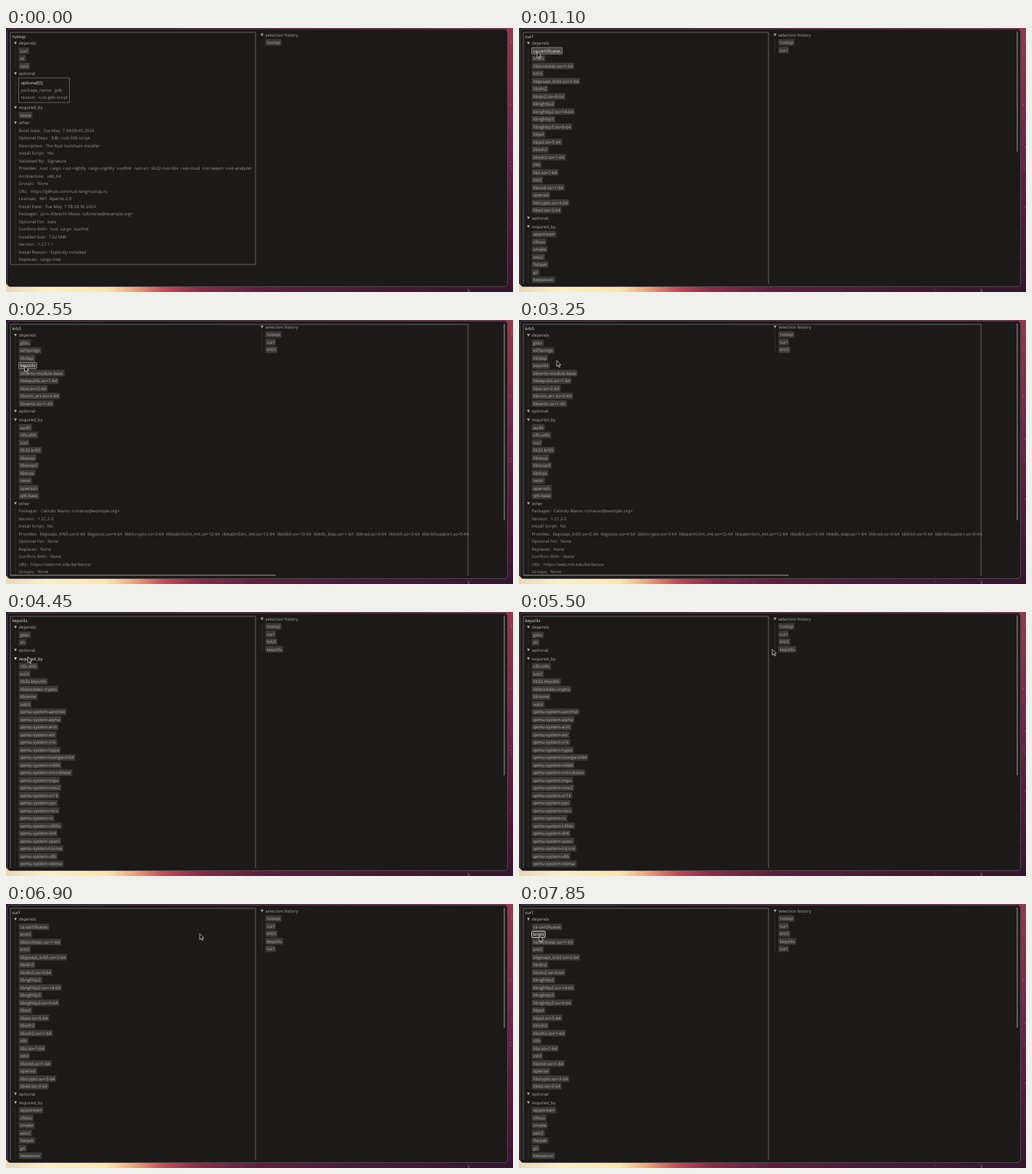
Write an HTML page that moves like this. It is 699 px wide and 365 px high and loops after 8000 ms.

```html
<!DOCTYPE html>
<html lang="en">
<head>
<meta charset="utf-8">
<title>Package browser</title>
<style>
  html, body { margin: 0; width: 100%; height: 100%; overflow: hidden; background: #3a1430; }
  svg { display: block; width: 699px; height: 365px; }
  text { font: 5.95px "Open Sans", "Noto Sans", sans-serif; white-space: pre; text-rendering: geometricPrecision; }
  .label { fill: #939390; }
  .strong { fill: #e6e6e4; }
  .line { fill: none; stroke: #63625f; stroke-width: 1; }
  .indent { stroke: #3a3937; stroke-width: .6; }
  .bar { fill: #858582; }
  .head { fill: #acacaa; }
  .head.hover, .head.press { fill: #f2f2f0; }
  .button rect { fill: #3b3a38; stroke: none; stroke-width: .8; }
  .button text { fill: #b0b0ae; }
  .button.hover rect { fill: #454442; stroke: #969694; }
  .button.hover text { fill: #f0f0ee; }
  .button.press rect { fill: #3d3c3a; stroke: #fff; }
  .button.press text { fill: #fff; }
</style>
</head>
<body>
<svg id="stage" viewBox="0 0 699 365">
  <defs>
    <linearGradient id="sky">
      <stop offset="0" stop-color="#2a1b2b"/>
      <stop offset=".5" stop-color="#40203a"/>
      <stop offset="1" stop-color="#6e2a46"/>
    </linearGradient>
    <linearGradient id="glow">
      <stop offset="0" stop-color="#e9d8b8"/>
      <stop offset=".08" stop-color="#faf0c4"/>
      <stop offset=".2" stop-color="#fbe5a4"/>
      <stop offset=".25" stop-color="#eea878"/>
      <stop offset=".31" stop-color="#c84a54"/>
      <stop offset=".38" stop-color="#8a2a48"/>
      <stop offset=".5" stop-color="#5e1e3c"/>
      <stop offset=".7" stop-color="#481a36"/>
      <stop offset="1" stop-color="#34142e"/>
    </linearGradient>
    <linearGradient id="side" x2="0" y2="1">
      <stop offset="0" stop-color="#93384f"/>
      <stop offset=".2" stop-color="#84304c"/>
      <stop offset=".5" stop-color="#642444"/>
      <stop offset="1" stop-color="#34142e"/>
    </linearGradient>
    <clipPath id="view"><rect x="4" y="4" width="685" height="350"/></clipPath>
  </defs>
  <rect width="699" height="365" fill="url(#sky)"/>
  <rect x="690" width="9" height="365" fill="url(#side)"/>
  <rect y="354" width="699" height="11" fill="url(#glow)"/>
  <g id="stars" fill="#e2a8b4"></g>
  <rect x="1.5" y="1.5" width="690" height="356" rx="4.5" fill="#1b1a18" stroke="#524a50"/>
  <g id="ui" clip-path="url(#view)"></g>
  <path id="cursor" d="M0 0V8.2L1.9 6.5 3.2 9.4 4.5 8.8 3.2 6H5.8Z" fill="#0c0c0c" stroke="#dadada" stroke-width=".75" stroke-linejoin="round"/>
</svg>
<script>
const LOOP = 8000, TICK = 50, PITCH = 10.5;
const $ = id => document.getElementById(id);

function add(parent, tag, attrs, text) {
  const el = document.createElementNS("http://www.w3.org/2000/svg", tag);
  for (const key in attrs) el.setAttribute(key, attrs[key]);
  if (text) el.textContent = text;
  parent.appendChild(el);
  return el;
}

const write = (parent, cls, x, y, text) =>
  add(parent, "text", { class: cls, x, y: y + 2.1 }, text);

// "key:  value" with the toolkit's item gap after the key
function label(parent, x, y, text) {
  const cut = text.indexOf(":") + 1;
  const el = write(parent, "label", x, y, text.slice(0, cut));
  add(el, "tspan", { dx: .7 }, text.slice(cut));
}

// Widgets keep their hit box so that hover follows from the pointer position.
function button(parent, list, x, y, text) {
  const el = add(parent, "g", { class: "button" });
  const box = add(el, "rect", { x, y: y - 4.5, height: 9, rx: 1 });
  const width = write(el, "", x + 2, y, text).getComputedTextLength() + 4;
  box.setAttribute("width", width);
  list.push({ el, cls: "button", x, y, right: x + width });
}

function header(parent, list, x, y, text) {
  const el = add(parent, "g", { class: "head" });
  add(el, "path", { d: `M${x - 6.5} ${y - 1.8}h4l-2 3.7z` });
  const width = write(el, "", x, y, text).getComputedTextLength();
  list.push({ el, cls: "head", x: x - 7, y, right: x + width });
}

const indent = (parent, x, top, bottom) =>
  add(parent, "line", { class: "indent", x1: x, x2: x, y1: top, y2: bottom });

const qemu = "aarch64 alpha arm avr cris hppa loongarch64 m68k microblaze mips nios2 or1k ppc riscv rx s390x sh4 sparc tricore x86 xtensa"
  .split(" ").map(arch => "qemu-system-" + arch).join(" ");

// scrollY and scrollX are the lengths of the scroll handles
const specs = [
  { name: "rustup", width: 338, height: 321,
    depends: "curl xz zstd",
    optional: ["package_name:  gdb", "reason:  rust-gdb script"],
    required: "None",
    other: [
      "Build Date:  Tue May  7 04:09:45 2024",
      "Optional Deps:  lldb: rust-lldb script",
      "Description:  The Rust toolchain installer",
      "Install Script:  Yes",
      "Validated By:  Signature",
      "Provides:  rust  cargo  rust-nightly  cargo-nightly  rustfmt  rust-src  lib32-rust-libs  rust-musl  rust-wasm  rust-analyzer",
      "Architecture:  x86_64",
      "Groups:  None",
      "URL:  https://github.com/rust-lang/rustup.rs",
      "Licenses:  MIT  Apache-2.0",
      "Install Date:  Tue May  7 08:28:36 2024",
      "Packager:  Jorn-Albrecht Meise <albmeise@example.org>",
      "Optional For:  kate",
      "Conflicts With:  rust  cargo  rustfmt",
      "Installed Size:  7.62 MiB",
      "Version:  1.27.1-1",
      "Install Reason:  Explicitly installed",
      "Replaces:  cargo-tree"
    ] },
  { name: "curl", width: 338, height: 500, scrollY: 166,
    depends: "ca-certificates brotli libbrotlidec.so=1-64 krb5 libgssapi_krb5.so=2-64 libidn2 libidn2.so=0-64 libnghttp2 libnghttp2.so=14-64 libnghttp3 libnghttp3.so=9-64 libpsl libpsl.so=5-64 libssh2 libssh2.so=1-64 zlib libz.so=1-64 zstd libzstd.so=1-64 openssl libcrypto.so=3-64 libssl.so=3-64",
    required: "appstream cfitsio cmake exiv2 flatpak git keepassxc" },
  { name: "krb5", width: 631, height: 500, scrollY: 272, scrollX: 366,
    depends: "glibc e2fsprogs libldap keyutils libverto-module-base libkeyutils.so=1-64 libss.so=2-64 libcom_err.so=2-64 libverto.so=1-64",
    required: "audit cifs-utils curl lib32-krb5 libsoup libsoup3 libtirpc neon openssh qt6-base",
    other: [
      "Packager:  Celindo Marvo <cmarvo@example.org>",
      "Version:  1.21.2-2",
      "Install Script:  No",
      "Provides:  libgssapi_krb5.so=2-64  libgssrpc.so=4-64  libk5crypto.so=3-64  libkadm5clnt_mit.so=12-64  libkadm5srv_mit.so=12-64  libkdb5.so=10-64  libkdb_ldap.so=1-64  libkrad.so=0-64  libkrb5.so=3-64  libkrb5support.so=0-64",
      "Optional For:  None",
      "Replaces:  None",
      "Conflicts With:  None",
      "URL:  https://web.mit.edu/kerberos/",
      "Groups:  None"
    ] },
  { name: "keyutils", width: 338, height: 500, scrollY: 221,
    depends: "glibc sh",
    required: "cifs-utils krb5 lib32-keyutils libblockdev-crypto libnvme ndctl " + qemu }
];

function buildPage(spec) {
  const g = add($("ui"), "g"), widgets = [];
  let y = 21;

  function section(title, rows, draw) {
    header(g, widgets, 17.5, y, title);
    const top = y + 5;
    for (const row of rows) draw(row, y += PITCH);
    indent(g, 13, top, y + 4.5);
    y += PITCH;
  }
  const asButton = (row, at) => button(g, widgets, 17.5, at, row);
  const asLabel = (row, at) => label(g, 17.5, at, row);

  add(g, "rect", { class: "line", x: 6, y: 6, width: spec.width, height: spec.height });
  write(g, "strong", 8.5, 12, spec.name);
  section("depends", spec.depends.split(" "), asButton);
  header(g, widgets, 17.5, y, "optional");
  if (spec.optional) {
    add(g, "rect", { class: "line", x: 17.5, y: 69, width: 70, height: 34 });
    write(g, "strong", 20.5, 76, "optional[0]");
    spec.optional.forEach((row, i) => label(g, 20.5, 86 + i * 10, row));
    indent(g, 13, y + 5, 103);
    y = 110;
  } else y += 12;
  section("required_by", spec.required.split(" "), asButton);
  if (spec.other) section("other", spec.other, asLabel);

  const bar = (x, y, width, height) =>
    add(g, "rect", { class: "bar", x, y, width, height, rx: .6 });
  if (spec.scrollY) bar(686.3, 5, 1.3, spec.scrollY);
  if (spec.scrollX) bar(6, 352.3, spec.scrollX, 1.3);
  return { g, widgets };
}

const pages = specs.map(buildPage);

const trail = [];
header($("ui"), trail, 357.5, 9.5, "selection history");
const trailLine = indent($("ui"), 353, 14.5, 24.5);
["rustup", "curl", "krb5", "keyutils", "curl"].forEach((name, i) =>
  button($("ui"), trail, 357.5, 20 + i * PITCH, name));

// Sparse specks on the wallpaper
let seed = 7;
const rand = () => (seed = seed * 16807 % 2147483647) / 2147483647;
for (let i = 0; i < 40; i++) {
  const low = i > 20;
  add($("stars"), "circle", {
    cx: low ? 240 + rand() * 450 : 693 + rand() * 5,
    cy: low ? 359 + rand() * 5 : rand() * 360,
    r: .3 + rand() * .4, opacity: .3 + rand() * .5
  });
}

// start time, page
const views = [[0, 0], [1050, 1], [2350, 2], [4250, 3], [6250, 1]];
const presses = [[850, 1050], [1950, 2350], [3950, 4250], [6050, 6250], [7850, 8000]];
// time, x, y of the pointer tip
const route = [
  [500, 118, 92], [600, 84, 66], [700, 50, 45], [800, 30, 36], [850, 25, 33],
  [1350, 25, 33], [1450, 27, 40], [1650, 28, 53], [1850, 26, 62], [1950, 25.5, 63.5],
  [2650, 25.5, 63.5], [2800, 32, 62], [2950, 48, 58], [3150, 61, 57], [3250, 52, 56],
  [3400, 38, 55], [3550, 33, 56], [3750, 31, 60], [3950, 30, 62],
  [4850, 30, 62], [4950, 42, 72], [5050, 78, 83], [5150, 140, 85], [5250, 205, 78],
  [5350, 270, 66], [5450, 328, 55], [5500, 349, 51.5], [5650, 367, 36], [5750, 366, 32],
  [6550, 366, 32], [6650, 355, 34], [6750, 328, 38], [6900, 267, 41], [7050, 208, 43],
  [7250, 112, 44], [7400, 56, 45], [7500, 36, 44.5], [7600, 28, 44]
];

function pointer(t) {
  const i = route.findIndex(p => p[0] > t);
  if (i < 0) return route[route.length - 1].slice(1);
  if (i === 0) return null;
  const [t0, x0, y0] = route[i - 1], [t1, x1, y1] = route[i];
  const k = (t - t0) / (t1 - t0);
  return [x0 + (x1 - x0) * k, y0 + (y1 - y0) * k];
}

function draw(t) {
  const step = views.filter(v => v[0] <= t).length - 1;
  const page = pages[views[step][1]];
  pages.forEach(p => p.g.style.display = p === page ? "" : "none");
  trail.forEach((w, i) => w.el.style.display = i <= step + 1 ? "" : "none");
  trailLine.setAttribute("y2", 24.5 + step * PITCH);

  const at = pointer(t);
  $("cursor").style.display = at ? "" : "none";
  if (at) $("cursor").setAttribute("transform", `translate(${at[0]} ${at[1]})`);

  const state = presses.some(([a, b]) => t >= a && t < b) ? " press" : " hover";
  for (const w of [...page.widgets, ...trail.slice(0, step + 2)]) {
    const over = at && at[0] >= w.x && at[0] <= w.right && Math.abs(at[1] - w.y) <= 4.7;
    w.el.setAttribute("class", w.cls + (over ? state : ""));
  }
}

const start = performance.now();
function frame() {
  const t = (performance.now() - start) % LOOP;
  draw(Math.floor(t / TICK) * TICK);
  requestAnimationFrame(frame);
}
frame();
</script>
</body>
</html>
```
